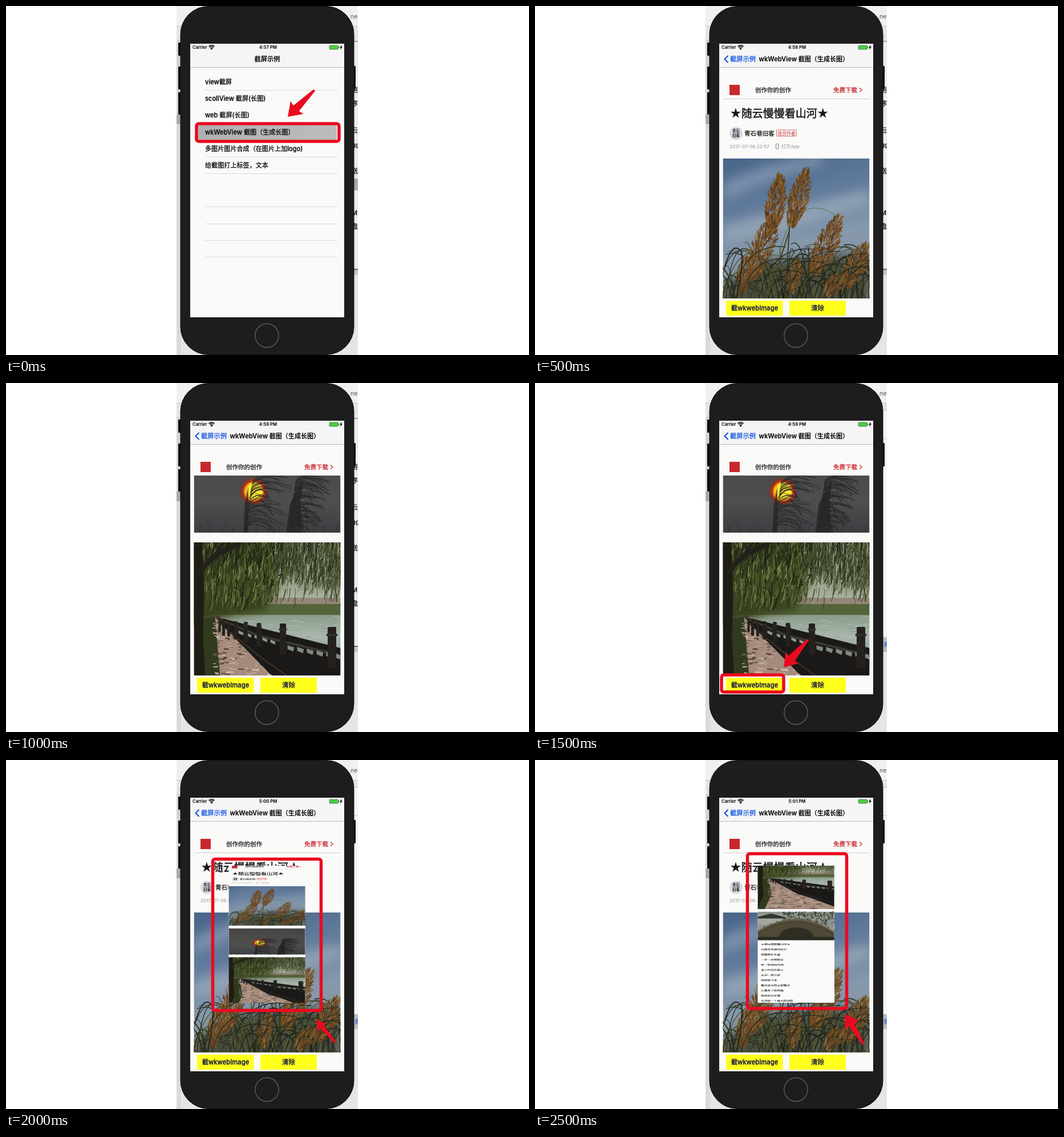
These frames come from a looping animation (917x611 px, 3000 ms). An HTML page with a canvas:

```html
<!DOCTYPE html>
<html lang="zh-CN">
<head>
<meta charset="utf-8">
<title>截屏示例</title>
<style>
html, body { margin: 0; width: 100%; height: 100%; overflow: hidden; background: #fff; }
canvas { display: block; }
</style>
</head>
<body>
<canvas id="stage" width="917" height="611"></canvas>
<script>
const ctx = document.getElementById('stage').getContext('2d');
const FONT = 'Inter, "Noto Sans CJK SC", "Noto Sans CJK", sans-serif';
const RED = '#ea0a20', BRAND = '#c8282d', PAPER = '#fafaf8', BLUE = '#1959e0';
const TITLE = '★随云慢慢看山河★';
const STEP = 500;

let seed = 1;
function rnd(a = 0, b = 1) {
  seed = (seed * 16807) % 2147483647;
  return a + (b - a) * seed / 2147483647;
}

function rect(x, y, w, h, color) {
  ctx.fillStyle = color;
  ctx.fillRect(x, y, w, h);
}

function text(s, x, y, size, color = '#0c0c0c', weight = 400, align = 'left') {
  ctx.font = `${weight} ${size}px ${FONT}`;
  ctx.textAlign = align;
  ctx.fillStyle = color;
  ctx.fillText(s, x, y + size * 0.37);
  // A hairline outline gives medium weight where only regular and bold exist.
  if (weight === 500) {
    ctx.strokeStyle = color;
    ctx.lineWidth = size * 0.026;
    ctx.strokeText(s, x, y + size * 0.37);
  }
}

function poly(points, color) {
  ctx.beginPath();
  points.forEach(([x, y]) => ctx.lineTo(x, y));
  ctx.closePath();
  ctx.fillStyle = color;
  ctx.fill();
}

function line(points, color, width = 1) {
  ctx.beginPath();
  points.forEach(([x, y]) => ctx.lineTo(x, y));
  ctx.strokeStyle = color;
  ctx.lineWidth = width;
  ctx.stroke();
}

function curve(x0, y0, cx, cy, x1, y1, color, width = 1) {
  ctx.beginPath();
  ctx.moveTo(x0, y0);
  ctx.quadraticCurveTo(cx, cy, x1, y1);
  ctx.strokeStyle = color;
  ctx.lineWidth = width;
  ctx.stroke();
}

function disc(x, y, r, color) {
  ctx.beginPath();
  ctx.arc(x, y, r, 0, Math.PI * 2);
  ctx.fillStyle = color;
  ctx.fill();
}

function roundBox(x, y, w, h, r) {
  ctx.beginPath();
  ctx.roundRect(x, y, w, h, r);
}

function gradient(x0, y0, x1, y1, colors) {
  const g = ctx.createLinearGradient(x0, y0, x1, y1);
  colors.forEach((c, i) => g.addColorStop(i / (colors.length - 1), c));
  return g;
}

function soft(radius, draw) {
  ctx.save();
  ctx.filter = `blur(${radius}px)`;
  draw();
  ctx.restore();
}

function clipped(x, y, w, h, draw) {
  ctx.save();
  ctx.beginPath();
  ctx.rect(x, y, w, h);
  ctx.clip();
  draw();
  ctx.restore();
}

function photo(y, h, paint) {
  clipped(329.5, y, 257, h, () => {
    ctx.translate(329.5, y);
    seed = 4711;
    paint();
  });
}

function plume(x0, y0, x1, y1, spread, count, colors) {
  const len = Math.hypot(x1 - x0, y1 - y0);
  const ux = (x0 - x1) / len, uy = (y0 - y1) / len;
  for (let i = 0; i < count; i++) {
    const t = rnd();
    const side = rnd(-1, 1) * spread * Math.sin(Math.PI * (0.08 + 0.8 * t));
    const x = x0 + (x1 - x0) * t - uy * side, y = y0 + (y1 - y0) * t + ux * side;
    const l = rnd(4, 11), bend = side * 0.3;
    line([[x, y], [x + ux * l - uy * bend, y + uy * l + ux * bend]],
      colors[i % colors.length], rnd(0.8, 1.9));
  }
}

function reeds() {
  rect(0, 0, 257, 245, gradient(30, 0, 90, 245, ['#4a668a', '#607a9b', '#8598ac', '#8a979f']));
  soft(9, () => {
    poly([[0, 42], [75, 12], [170, -8], [180, 8], [70, 45], [0, 75]], 'rgba(175,188,202,.4)');
    poly([[0, 118], [90, 92], [257, 55], [257, 80], [100, 130], [0, 150]], 'rgba(180,190,200,.45)');
    poly([[0, 225], [60, 180], [257, 165], [257, 260], [0, 260]], 'rgba(48,50,28,.75)');
  });
  for (let i = 0; i < 130; i++) {
    const x = rnd(-10, 267), lean = rnd(-70, 75), top = rnd(145, 225);
    curve(x, 248, x + lean * 0.25, top - 15, x + lean, top + rnd(-5, 28),
      ['#23281a', '#3a3f22', '#575a30', '#1a1e16'][i % 4], rnd(0.7, 1.8));
  }
  const brown = ['#66431f', '#7d5629', '#936b38', '#4e351c', '#70491f'];
  line([[118, 100], [109, 245]], '#39401f', 2);
  line([[117, 125], [78, 245]], '#454321', 2);
  plume(100, 33, 84, 132, 15, 520, brown);
  plume(88, 105, 50, 212, 17, 480, brown);
  plume(145, 24, 119, 122, 15, 520, brown);
  plume(203, 105, 157, 205, 17, 480, brown);
  plume(250, 153, 214, 226, 16, 320, brown);
  plume(42, 175, 32, 238, 11, 200, brown);
  plume(129, 183, 120, 238, 12, 140, brown);
  plume(202, 208, 182, 244, 12, 140, brown);
  curve(95, 190, 112, 75, 174, 88, '#56703e', 1);
  curve(174, 88, 195, 94, 207, 112, '#56703e', 1);
  for (let i = 0; i < 16; i++) {
    const x = 15 + i * 16;
    curve(x, 248, x + 20, 145 + (i * 17) % 45, x + 95, 155 + (i * 23) % 65, '#23291c', 1.3);
  }
  curve(3, 190, 18, 140, 33, 165, '#22271e', 2);
  curve(33, 165, 35, 195, 24, 243, '#22271e', 2);
}

function hair(x, y, w, h, count) {
  for (let i = 0; i < count; i++) {
    const t = i / count, sx = x + w * 0.2 * t, sy = y - h * t;
    curve(sx, sy, sx + w * rnd(0.15, 0.35), sy - rnd(16, 32),
      sx + w * rnd(0.4, 1), sy + rnd(-12, 15), '#262727', rnd(0.5, 1.2));
  }
}

function sunset() {
  rect(0, 0, 257, 163, gradient(0, 0, 0, 163, ['#454342', '#4c4b4a', '#4e4e4e', '#3c3e41']));
  const glow = ctx.createRadialGradient(105, 91, 14, 105, 91, 26);
  glow.addColorStop(0, '#e6421b');
  glow.addColorStop(0.5, '#a8301f');
  glow.addColorStop(1, 'rgba(90,45,38,0)');
  disc(105, 91, 26, glow);
  disc(105, 91, 17, '#f1a51d');
  disc(106, 90, 14, '#fce42f');
  poly([[87, 163], [89, 115], [95, 82], [96, 115], [95, 163]], 'rgba(34,34,35,.7)');
  hair(88, 160, 74, 88, 46);
  poly([[162, 163], [168, 114], [184, 80], [192, 72], [187, 105], [190, 163]], '#2a2b2c');
  hair(166, 162, 64, 92, 70);
  for (let i = 0; i < 13; i++) {
    const x = 8 + i * 20;
    curve(x, 166, x + 3, 152, x + rnd(-8, 12), rnd(140, 158), '#2a2c2e', 1);
  }
}

function willow(count, x0, x1, bottom, colors) {
  for (let i = 0; i < count; i++) {
    const x = rnd(x0, x1), y = rnd(-25, bottom), l = rnd(8, 28);
    curve(x, y, x + rnd(-1, 4), y + l * 0.5, x + rnd(-7, 2), y + l,
      colors[i % colors.length], rnd(0.6, 1.8));
  }
}

function lakeside() {
  rect(0, 0, 257, 325, gradient(0, 0, 0, 130, ['#68714e', '#98a088', '#b9beb4']));
  rect(128, 97, 129, 12, '#94877a');
  rect(0, 108, 257, 24, '#56643c');
  rect(0, 127, 257, 100, gradient(0, 127, 0, 200, ['#8a9c88', '#a9b5ac', '#93a198']));
  for (let i = 0; i < 70; i++) {
    const x = rnd(80, 257), y = rnd(130, 190);
    line([[x, y], [x + rnd(6, 20), y]], i % 2 ? '#bcc6be' : '#84958a', 0.8);
  }
  soft(7, () => {
    poly([[-20, -20], [150, -20], [150, 70], [125, 118], [80, 125], [-20, 150]], '#38421f');
    poly([[140, -20], [277, -20], [277, 80], [215, 75], [185, 45], [150, 70]], 'rgba(48,58,32,.75)');
  });
  poly([[10, 135], [46, 128], [56, 200], [58, 325], [0, 325]], '#303a1c');
  poly([[37, 130], [51, 132], [175, 252], [257, 306], [257, 325], [24, 325], [46, 235]], '#a48b7b');
  for (let i = 0; i < 230; i++) {
    const y = rnd(138, 322), t = (y - 133) / 190;
    const x = 38 + rnd(-8, 12 + t * 190);
    line([[x, y], [x + rnd(4, 8 + t * 14), y + rnd(-2, 3)]],
      ['#594a3d', '#d3bdae', '#41372d', '#c0a797'][i % 4], rnd(0.8, 1.2 + t * 3));
  }
  poly([[37, 130], [257, 185], [257, 310], [176, 254], [133, 230], [50, 145]], '#1b1917');
  line([[39, 132], [113, 163], [257, 198]], '#3b3630', 4);
  line([[41, 139], [117, 201], [176, 243], [257, 287]], '#3d362f', 2);
  for (let i = 0; i < 6; i++) {
    const x = 164 + i * 17;
    poly([[x, 180 + i * 3], [x + 12, 184 + i * 3], [x + 10, 191 + i * 3], [x, 187 + i * 3]], '#7d897d');
  }
  for (let i = 0; i < 5; i++) {
    const x = 78 + i * 14;
    poly([[x, 154 + i * 4], [x + 9, 158 + i * 4], [x + 8, 163 + i * 4], [x, 159 + i * 4]], '#89958b');
  }
  [[45, 134, 4], [52, 136, 5], [61, 137, 5], [73, 138, 6], [91, 139, 7], [114, 141, 8], [156, 142, 11], [242, 148, 15]]
    .forEach(([x, y, w]) => {
      rect(x - w / 2, y + 5, w, w * 4.5, '#24211e');
      roundBox(x - w / 2, y, w, w * 0.7, 2);
      ctx.fill();
      rect(x - w * 0.65, y + w * 0.8, w * 1.3, w * 0.28, '#322e29');
    });
  willow(650, 10, 150, 98, ['#28311a', '#434f24', '#5c6a34', '#1d2415', '#79854c']);
  willow(480, 140, 262, 70, ['#29321d', '#434e2b', '#1e2517', '#a0a692', '#5f6b40']);
  willow(120, 150, 262, 98, ['#3b4727', '#556239']);
  willow(110, -5, 120, 25, ['#1b2015', '#252b18']);
  poly([[0, 0], [14, 0], [18, 90], [16, 165], [20, 240], [0, 325]], '#1f1c16');
  curve(10, 55, 28, 19, 80, 4, '#24211a', 9);
  curve(28, 32, 48, 8, 55, -4, '#24211a', 5);
}

function bridge() {
  rect(0, 0, 257, 178, '#8f968f');
  rect(0, 18, 92, 62, '#a4a79f');
  poly([[0, 32], [45, 12], [92, 34], [92, 43], [0, 43]], '#34372f');
  for (let i = 0; i < 210; i++) {
    const x = rnd(85, 260), y = rnd(-8, 75);
    line([[x, y], [x + rnd(-9, 12), y + rnd(6, 18)]], i % 3 ? '#353c30' : '#677059', rnd(1.5, 4));
  }
  ctx.beginPath();
  ctx.moveTo(0, 125);
  ctx.quadraticCurveTo(70, 48, 133, 43);
  ctx.quadraticCurveTo(195, 44, 257, 130);
  ctx.lineTo(257, 178);
  ctx.lineTo(0, 178);
  ctx.fillStyle = '#504936';
  ctx.fill();
  ctx.beginPath();
  ctx.ellipse(130, 160, 58, 62, 0, Math.PI, 0);
  ctx.fillStyle = '#302e23';
  ctx.fill();
  curve(0, 120, 132, -26, 257, 128, '#7b7159', 5);
  curve(0, 136, 132, -5, 257, 145, '#39372c', 3);
  for (let i = 0; i < 13; i++) {
    const t = i / 12, y = 120 - 145 * 2 * t * (1 - t);
    rect(257 * t - 2, y - 7, 5, 18, '#625b48');
  }
  rect(0, 157, 257, 21, '#292b21');
}

function wifi(x, y) {
  ctx.strokeStyle = '#111';
  ctx.lineWidth = 1.5;
  [2.6, 5, 7.2].forEach(r => {
    ctx.beginPath();
    ctx.arc(x, y, r, -Math.PI * 0.75, -Math.PI * 0.25);
    ctx.stroke();
  });
  disc(x, y - 0.7, 1.2, '#111');
}

function statusBar(time) {
  rect(323, 66, 270, 479, PAPER);
  rect(323, 66, 270, 41, '#f5f5f5');
  rect(323, 107, 270, 1, '#b9b9b9');
  text('Carrier', 327, 72.5, 7.7, '#111', 500);
  wifi(360.5, 76);
  text(time, 459.5, 72.5, 7.7, '#111', 700, 'center');
  roundBox(567, 69, 15.5, 7, 1.5);
  ctx.fillStyle = '#48cf3e';
  ctx.fill();
  ctx.strokeStyle = '#555';
  ctx.lineWidth = 0.7;
  ctx.stroke();
  rect(583, 71, 1, 3, '#666');
  poly([[588.5, 68], [585, 73], [587, 73], [586, 77], [590, 71.5], [588, 71.5]], '#111');
}

// Slivers of the desktop windows behind the phone.
function desktop(later) {
  rect(0, 0, 917, 611, '#fff');
  rect(299, 0, 318, 611, '#e5e5e5');
  rect(299, 0, 318, 35, '#f0f0f0');
  rect(299, 35, 318, 1, '#c2c2c2');
  rect(299, 60, 8, 1, '#bcbcbc');
  rect(299, 62, 8, 128, '#d5d5d5');
  rect(299, 190, 8, 17, '#aaa');
  rect(299, 207, 8, 404, '#dadada');
  clipped(600, 0, 17, 611, () => {
    text('ne', 604, 18, 10.5, '#555');
    if (later) {
      rect(608, 47, 9, 398, '#f5f5f5');
      rect(611, 47, 6, 1, '#bbb');
      rect(608, 97, 9, 1, '#ccc');
      rect(608, 445, 9, 26, '#b9bdc3');
      text('图', 612, 458, 9, '#2b60c5', 500);
    } else {
      rect(608, 61, 9, 2, '#a4a4a4');
      rect(608, 63, 9, 397, '#ececec');
      rect(608, 112, 9, 1, '#ccc');
      [['用', 147], ['序', 171], ['云', 218], ['gg', 243], ['送', 289], ['M', 362], ['盘', 386]]
        .forEach(([s, y]) => text(s, 606, y, 11, '#202020', 500));
      rect(608, 460, 9, 2, '#666');
      rect(608, 462, 9, 9, '#c4c4c4');
    }
  });
}

function phone() {
  [[302, 64, 23], [302, 106, 40], [302, 151, 39], [608, 105, 41]].forEach(([x, y, h]) => {
    roundBox(x, y, 5, h, 1);
    ctx.fillStyle = '#0a0a0a';
    ctx.fill();
  });
  roundBox(306, 0.5, 304, 610, 49);
  ctx.fillStyle = '#1d1d1d';
  ctx.fill();
  ctx.strokeStyle = '#101010';
  ctx.lineWidth = 1;
  ctx.stroke();
  ctx.beginPath();
  ctx.arc(457.5, 577, 20.7, 0, Math.PI * 2);
  ctx.strokeStyle = '#595959';
  ctx.lineWidth = 1.5;
  ctx.stroke();
}

function redBox(x, y, w, h) {
  roundBox(x, y, w, h, 4);
  ctx.strokeStyle = RED;
  ctx.lineWidth = 5.5;
  ctx.stroke();
}

function arrow(x, y, tailX, tailY, head, half, shaft) {
  const len = Math.hypot(tailX - x, tailY - y);
  ctx.save();
  ctx.translate(x, y);
  ctx.rotate(Math.atan2(tailY - y, tailX - x));
  poly([[0, 0], [head, -half], [head - 2, -shaft], [len - 1, -2], [len, 0],
    [len - 1, 2], [head - 2, shaft], [head, half]], RED);
  ctx.restore();
}

function menu() {
  text('截屏示例', 458, 93, 11.25, '#0c0c0c', 700, 'center');
  rect(337, 208, 243, 27, gradient(337, 0, 580, 0, ['#b1b1b1', '#bcbcbc']));
  ['view截屏', 'scollView 截屏(长图)', 'web 截屏(长图)', 'wkWebView 截图（生成长图）',
    '多图片图片合成（在图片上加logo)', '给截图打上标签，文本']
    .forEach((s, i) => text(s, 349, 132.7 + i * 29.3, 11.1, '#0c0c0c', 500));
  [147, 264, 293, 351, 381, 410, 439].forEach(y => rect(349, y, 231, 1, '#dadada'));
  redBox(334, 206, 250, 31);
  arrow(494, 194, 541, 147, 23, 16, 7);
}

function chevron(x, y, w, h, color, width) {
  line([[x + w, y - h], [x, y], [x + w, y + h]], color, width);
}

function siteHeader() {
  rect(341, 138, 18, 18, BRAND);
  text('创作你的创作', 386, 147, 10.5, '#222', 500);
  text('免费下载', 523, 147, 10.5, BRAND, 500);
  chevron(573, 147, -4, 3.5, BRAND, 1.2);
}

function article() {
  rect(330, 162, 257, 1, '#cfcfcf');
  text(TITLE, 342, 188, 19, '#161616', 500);
  disc(352.5, 223, 11.5, '#dcd9e2');
  text('青石', 352.5, 219, 6.5, '#222', 800, 'center');
  text('旧客', 352.5, 227, 6.5, '#222', 800, 'center');
  text('青石巷旧客', 367, 223, 10.6, '#222', 500);
  roundBox(423.5, 217, 34.5, 11, 1);
  ctx.strokeStyle = BRAND;
  ctx.lineWidth = 0.7;
  ctx.stroke();
  text('拾页作者', 441, 222.7, 7.8, BRAND, 400, 'center');
  text('2017-07-06 22:57', 341, 246.3, 8.2, '#929292');
  roundBox(422.5, 241.5, 4.5, 8.5, 1);
  ctx.strokeStyle = '#777';
  ctx.lineWidth = 1;
  ctx.stroke();
  text('打开App', 432, 246.3, 8.2, '#929292');
  photo(267, 245, reeds);
  photo(529, 163, sunset);
  photo(709, 325, lakeside);
  photo(1050, 178, bridge);
  [TITLE, '山路弯弯通向远方', '晚霞落在水面', '一步一步慢慢走', '听一听林间鸟鸣', '多少时光在路上',
    '走过一座小桥', '轻轻停下来', '看见满天的云彩飘过', '心里有了新的歌', '和风吹过长堤', '走进每一个春天的清晨']
    .forEach((s, i) => text(s, 341, 1253 + i * 32, 10.8, '#222', 500));
}

function browser(scroll) {
  chevron(332.5, 93, 6, 6, BLUE, 2.2);
  text('截屏示例', 342, 93, 11.25, BLUE, 500);
  text('wkWebView 截图（生成长图）', 392.5, 93, 11.05, '#0c0c0c', 700);
  siteHeader();
  clipped(323, 162, 270, 350, () => {
    ctx.translate(0, -scroll);
    article();
  });
  rect(335, 516, 99.5, 26, '#ffff1c');
  rect(446, 516, 99, 26, '#ffff1c');
  text('截wkwebImage', 385, 529, 11.25, '#101044', 500, 'center');
  text('清除', 495.5, 529, 11.5, '#101044', 500, 'center');
}

function longShot(shift) {
  clipped(390.5, 185, 134.5, 240, () => {
    rect(390, 185, 136, 240, PAPER);
    ctx.translate(390.5, 221 - shift);
    ctx.scale(134.5 / 257, 0.2816);
    ctx.translate(-330, -267);
    siteHeader();
    article();
  });
}

const scenes = [
  { time: '4:57 PM', draw: menu },
  { time: '4:58 PM', draw: () => browser(0) },
  { time: '4:59 PM', draw: () => browser(430) },
  { time: '4:59 PM', draw() {
    browser(430);
    redBox(327, 511, 109, 30);
    arrow(436, 498, 479, 449, 23, 15, 7);
  } },
  { time: '5:00 PM', draw() {
    browser(0);
    longShot(0);
    redBox(362.5, 173.5, 190, 265);
    arrow(543, 455, 578, 495, 18, 10, 4);
  } },
  { time: '5:01 PM', draw() {
    browser(0);
    longShot(176);
    redBox(372.5, 164, 174, 271);
    arrow(544, 445, 576, 498, 23, 15, 5.5);
  } }
];

let shown = -1;
function tick(now) {
  const index = Math.floor(now / STEP) % scenes.length;
  if (index !== shown) {
    shown = index;
    desktop(index > 2);
    if (index === 0) rect(608, 302, 9, 21, '#aaa');
    phone();
    statusBar(scenes[index].time);
    scenes[index].draw();
  }
  requestAnimationFrame(tick);
}
tick(0);
</script>
</body>
</html>
```
